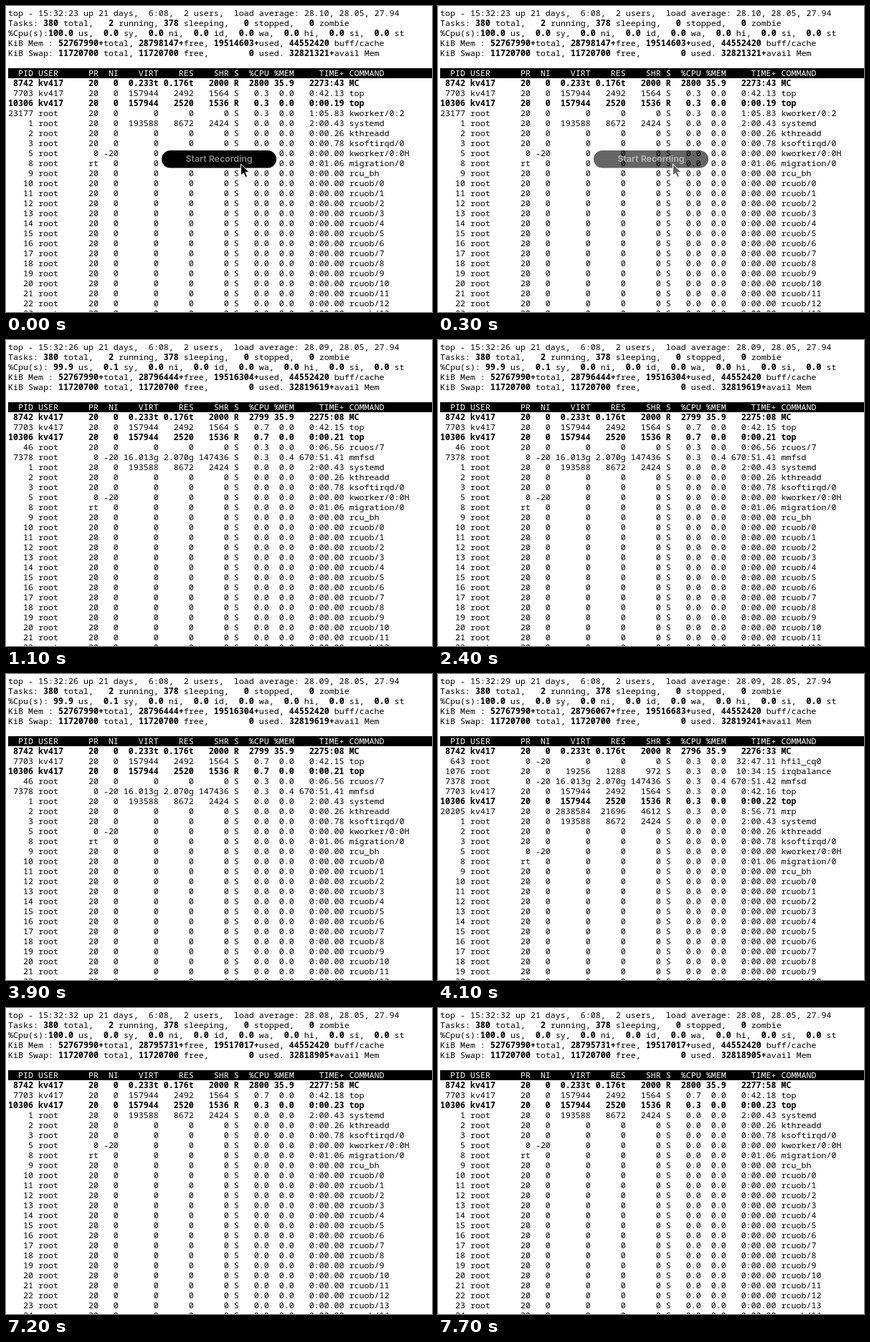
Write an HTML page that moves like this. It is 594 px wide and 428 px high and loops after 8 s.

```html
<!DOCTYPE html>
<html lang="en">
<head>
<meta charset="utf-8">
<title>top</title>
<style>
  html, body { margin: 0; width: 100%; height: 100%; overflow: hidden; background: #fff; }
  svg { display: block; }
  #screen text {
    font: 500 11.667px "Noto Sans Mono", "DejaVu Sans Mono", monospace;
    white-space: pre;
  }
  #screen .bold { font-weight: 700; }
  #button text { font: 600 12.4px Inter, "Liberation Sans", sans-serif; fill: #8b8b8b; text-anchor: middle; }
</style>
</head>
<body>
<svg width="594" height="428" viewBox="0 0 594 428" xml:space="preserve">
  <g id="screen"></g>
  <g id="button">
    <rect x="217" y="202" width="160" height="24.5" rx="12.2"/>
    <text x="297" y="218">Start Recording</text>
    <path d="M327.5 221v16l3.7-3.4 2.6 6 2.8-1.2-2.6-5.8h5.2z" stroke="#fff"/>
  </g>
</svg>
<script>
const LOOP = 8000;
const ROWS = 24;
const HEADER = '  PID USER      PR  NI    VIRT    RES    SHR S  %CPU %MEM     TIME+ COMMAND';
const WIDTHS = [5, -10, 3, 4, 8, 7, 7, 2, 6, 5, 10];   // negative: left aligned
const USER = 'kv417';

const TAIL = [
  '1 root 20 0 193588 8672 2424 S 0.0 0.0 2:00.43 systemd',
  idle(2, 'kthreadd', '0:00.26'),
  idle(3, 'ksoftirqd/0', '0:00.78'),
  idle(5, 'kworker/0:0H', '0:00.00', '0 -20'),
  idle(8, 'migration/0', '0:01.06', 'rt 0'),
  idle(9, 'rcu_bh')
];
for (let i = 0; i < 16; i++) TAIL.push(idle(10 + i, 'rcuob/' + i));

function idle(pid, command, time = '0:00.00', priority = '20 0', cpu = '0.0') {
  return `${pid} root ${priority} 0 0 0 S ${cpu} 0.0 ${time} ${command}`;
}

const mc = (cpu, time) => `8742 ${USER} 20 0 0.233t 0.176t 2000 R ${cpu} 35.9 ${time} MC`;
const watcher = (cpu, time) => `7703 ${USER} 20 0 157944 2492 1564 S ${cpu} 0.0 ${time} top`;
const self = (cpu, time) => `10306 ${USER} 20 0 157944 2520 1536 R ${cpu} 0.0 ${time} top`;
const mmfsd = time => `7378 root 0 -20 16.013g 2.070g 147436 S 0.3 0.4 ${time} mmfsd`;

const states = [
  { at: 0, clock: '23', load: '28.10', us: '100.0', sy: '0.0',
    free: 28798147, used: 19514603, avail: 32821321,
    busy: [mc(2800, '2273:43'), watcher('0.3', '0:42.13'), self('0.3', '0:00.19'),
      idle(23177, 'kworker/0:2', '1:05.83', '20 0', '0.3')] },
  { at: 1100, clock: '26', load: '28.09', us: ' 99.9', sy: '0.1',
    free: 28796444, used: 19516304, avail: 32819619,
    busy: [mc(2799, '2275:08'), watcher('0.7', '0:42.15'), self('0.7', '0:00.21'),
      idle(46, 'rcuos/7', '0:06.56', '20 0', '0.3'), mmfsd('670:51.41')] },
  { at: 4100, clock: '29', load: '28.09', us: '100.0', sy: '0.0',
    free: 28796067, used: 19516683, avail: 32819241,
    busy: [mc(2796, '2276:33'), idle(643, 'hfi1_cq0', '32:47.11', '0 -20', '0.3'),
      '1076 root 20 0 19256 1288 972 S 0.3 0.0 10:34.15 irqbalance',
      mmfsd('670:51.42'), watcher('0.3', '0:42.16'), self('0.3', '0:00.22'),
      `20205 ${USER} 20 0 2838584 21696 4612 S 0.3 0.0 8:56.71 mrp`] },
  { at: 7200, clock: '32', load: '28.08', us: '100.0', sy: '0.0',
    free: 28795731, used: 19517017, avail: 32818905,
    busy: [mc(2800, '2277:58'), watcher('0.7', '0:42.18'), self('0.3', '0:00.23')] }
];

function processLine(entry) {
  const cells = entry.split(' ');
  const command = cells.pop();
  const line = cells.map((cell, i) => WIDTHS[i] < 0
    ? (' ' + cell).padEnd(-WIDTHS[i]) : cell.padStart(WIDTHS[i])).join('') + ' ' + command;
  return cells[7] === 'R' ? `[${line}]` : line;
}

// Text in square brackets is bold.
function summary(s) {
  const rest = ['ni', 'id', 'wa', 'hi', 'si', 'st'].map(name => `[  0.0 ]${name}`).join(',');
  return [
    `top - 15:32:${s.clock} up 21 days,  6:08,  2 users,  load average: ${s.load}, 28.05, 27.94`,
    'Tasks: [380 ]total, [  2 ]running, [378 ]sleeping, [  0 ]stopped, [  0 ]zombie',
    `%Cpu(s):[${s.us} ]us,[  ${s.sy} ]sy,${rest}`,
    `KiB Mem : [52767990+]total, [${s.free}+]free, [${s.used}+]used, [44552420 ]buff/cache`,
    `KiB Swap: [11720700 ]total, [11720700 ]free, [       0 ]used. [${s.avail}+]avail Mem`,
    '',
    HEADER
  ];
}

function render(s) {
  const lines = [...summary(s), ...[...s.busy, ...TAIL].slice(0, ROWS).map(processLine)];
  return '<rect x="3" y="87" width="591" height="14"/>' + lines.map((line, i) =>
    `<text xml:space="preserve" x="3" y="${14 + 14 * i}" fill="${line === HEADER ? '#fff' : '#000'}">` +
    line.replace(/\[(.*?)\]/g, '<tspan class="bold">$1</tspan>') + '</text>').join('');
}

const screen = document.getElementById('screen');
const button = document.getElementById('button');
let shown;

function draw() {
  const t = performance.now() % LOOP;
  const state = states.filter(s => s.at <= t).pop();
  if (state !== shown) screen.innerHTML = render(shown = state);
  const step = Math.max(0, Math.floor(t / 100) - 1);
  button.setAttribute('opacity', Math.max(0, 1 - step / 5));
  requestAnimationFrame(draw);
}
draw();
</script>
</body>
</html>
```
